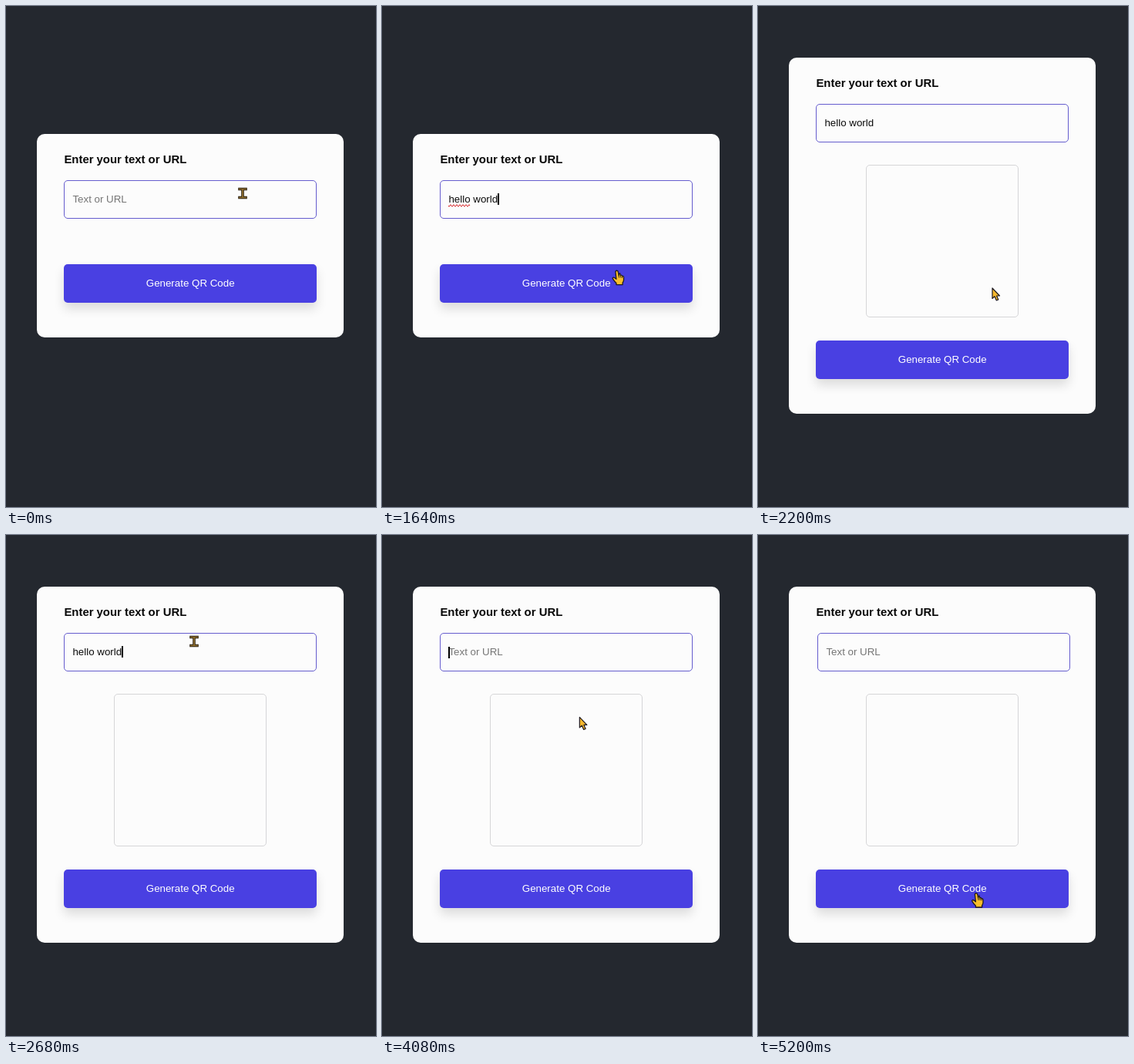
An HTML page for the animation above (5240 ms loop, 480 px wide and 650 px high).

```html
<!DOCTYPE html>
<html lang="en">
<head>
<meta charset="utf-8">
<title>Code generator form</title>
<style>
  html, body { margin: 0; width: 100%; height: 100%; overflow: hidden; background: #24282f; }
  #stage { position: relative; width: 480px; height: 650px; overflow: hidden;
    font: 13.333px "Liberation Sans", Arial, sans-serif; cursor: default; }
  #stage div, #stage svg { position: absolute; box-sizing: border-box; }
  #card { left: 40.4px; width: 397.4px; background: #fcfcfc; border-radius: 10px; }
  #title { left: 35px; top: 23px; font-size: 14.9px; font-weight: bold; line-height: 20px;
    color: #080808; white-space: nowrap; }
  #field { left: 35px; top: 60px; width: 327.6px; height: 50px; padding-left: 10px;
    border: 1px solid #655dce; border-radius: 5px; line-height: 48px; white-space: pre; }
  #caret { display: inline-block; width: 1.5px; height: 15px; margin-right: -1.5px;
    vertical-align: -3px; background: #000; }
  #wave { left: 10px; top: 30px; overflow: visible; }
  #result { left: 99.6px; top: 139px; width: 198.4px; border: 1px solid #d6d6d8; border-radius: 5px; }
  #button { left: 35px; width: 327.6px; height: 49.5px; line-height: 49px; text-align: center;
    color: #fff; background: #4940e2; border-radius: 5px; box-shadow: 0 8px 14px rgba(0, 0, 0, .13); }
  #pointer { left: 0; top: 0; overflow: visible; }
</style>
</head>
<body>
<div id="stage">
  <div id="card">
    <div id="title">Enter your text or URL</div>
    <div id="field"><span id="text"></span><span id="caret"></span>
      <svg id="wave" width="29" height="4"><path fill="none" stroke="#d8282c" stroke-width="1"/></svg></div>
    <div id="result"></div>
    <div id="button">Generate QR Code</div>
  </div>
  <svg id="pointer" width="1" height="1" stroke-linejoin="round">
    <g data-kind="beam" fill="none">
      <path d="M-4-5.5H4M0-5.5V5.5M-4 5.5H4" stroke="#2b2112" stroke-width="3.6" stroke-linecap="square"/>
      <path d="M-4-5.5H4M0-5.5V5.5M-4 5.5H4" stroke="#91702f" stroke-width="1.7" stroke-linecap="square"/>
    </g>
    <g data-kind="arrow" stroke="#1f1a20" stroke-width="1.2">
      <path id="tip" fill="#f6b72c" d="M0 0V13.5L3 10.8L5.3 16L7.8 15L5.6 10H9.5Z"/>
    </g>
    <g data-kind="busy" stroke="#1f1a20" stroke-width="1.2">
      <path fill="#f6b72c" d="M0 0V13.5L3 10.8L5.3 16L7.8 15L5.6 10H9.5Z"/>
      <path fill="#d79a25" d="M10.5 2.5H19.5V4.5H18.5Q18.5 7 16.2 8.8Q18.5 10.6 18.5 13H19.5V15H10.5V13H11.5Q11.5 10.6 13.8 8.8Q11.5 7 11.5 4.5H10.5Z"/>
      <path fill="none" d="M12 4.5H18M12 13H18"/>
    </g>
    <g data-kind="hand" fill="#f9be2b" stroke="#1f1a20" stroke-width="1.3">
      <path d="M-1.6 1.2Q-1.2-.6.6-.2Q1.6.2 1.8 1.6L2.6 6Q4-.0 4.8 6Q6.2 5 7 6.8Q8.8 6.4 9 8.4V12Q8.6 14.5 7.6 15.5V18H-.6V16Q-3 13.8-5 10.6Q-6 9-4.4 8.5Q-3.2 8.3-.6 10.8Z"/>
      <path fill="none" stroke-width=".9" d="M2.6 6L3 9M4.9 6L5.1 9M7 7V9.4"/>
    </g>
  </svg>
</div>
<script>
const LOOP = 5240, TICK = 40, PHRASE = 'hello world';
const $ = id => document.getElementById(id);
const clamp = (v, lo, hi) => Math.max(lo, Math.min(hi, v));
const within = (t, a, b) => t >= a && t < b;

// Pointer travel: start, end, from, to
const moves = [
  [1320, 1760, [307, 243], [304, 366]],
  [2280, 2520, [304, 366], [244, 138]],
  [3960, 4280, [244, 138], [283, 449]],
  [4680, 4960, [283, 449], [283, 465]]
];

let zigzag = 'M0 2';
for (let x = 1; x <= 28; x++) zigzag += `L${x} ${2 + 1.3 * Math.sin(x * Math.PI / 2)}`;
$('wave').firstChild.setAttribute('d', zigzag);

function pointerAt(t) {
  let pos = moves[0][2];
  for (const [start, end, from, to] of moves) {
    if (t < start) break;
    const p = clamp((t - start) / (end - start), 0, 1);
    const e = p * p * (3 - 2 * p);
    pos = from.map((v, i) => v + (to[i] - v) * e);
  }
  return pos;
}

function typedCount(t) {
  return t < 2900
    ? clamp(Math.floor((t - 240) / 80), 0, PHRASE.length)
    : clamp(PHRASE.length - Math.floor((t - 2900) / 66), 0, PHRASE.length);
}

function caretOn(t) {
  const focused = within(t, 120, 1880) || within(t, 2600, 4320);
  return focused && (t < 1160 || (t - 200) % 480 < 240);
}

function pointerKind(t, x, y, top, grown) {
  if (within(t, 1960, 2200)) return 'busy';
  const inside = (a, h) => x > 75 && x < 403 && y >= top + a && y <= top + a + h;
  if (inside(60, 50)) return 'beam';
  return inside(169 + grown, 49) ? 'hand' : 'arrow';
}

function draw(t) {
  const grown = t < 1920 ? 0 : t < 2200 ? 22 : 198;
  const top = 166 - grown / 2;
  $('card').style.top = top + 'px';
  $('card').style.height = 264 + grown + 'px';
  $('result').style.height = grown + 'px';
  $('result').style.display = grown ? '' : 'none';
  $('button').style.top = 169 + grown + 'px';

  const count = typedCount(t);
  $('text').textContent = count ? PHRASE.slice(0, count) : 'Text or URL';
  $('text').style.color = count ? '#0c0c0c' : '#757575';
  // With an empty field the caret stands before the placeholder
  $('caret').style.position = count ? '' : 'absolute';
  $('caret').style.left = count ? '' : '10px';
  $('caret').style.top = count ? '' : '17px';
  $('caret').style.visibility = caretOn(t) ? '' : 'hidden';
  $('wave').style.display = count > 5 && t < 1880 ? '' : 'none';

  const shake = t < 4320 ? 0 : 2 * Math.cos((t - 4560) / 160 * 2 * Math.PI);
  $('field').style.transform = `translateX(${shake.toFixed(2)}px)`;

  const [x, y] = pointerAt(t);
  const kind = pointerKind(t, x, y, top, grown);
  $('pointer').style.transform = `translate(${x}px, ${y}px)`;
  for (const g of $('pointer').children) g.style.display = g.dataset.kind === kind ? '' : 'none';
}

const begin = performance.now();
function frame() {
  const t = (performance.now() - begin) % LOOP;
  draw(Math.floor(t / TICK) * TICK);
  requestAnimationFrame(frame);
}
draw(0);
requestAnimationFrame(frame);
</script>
</body>
</html>
```
